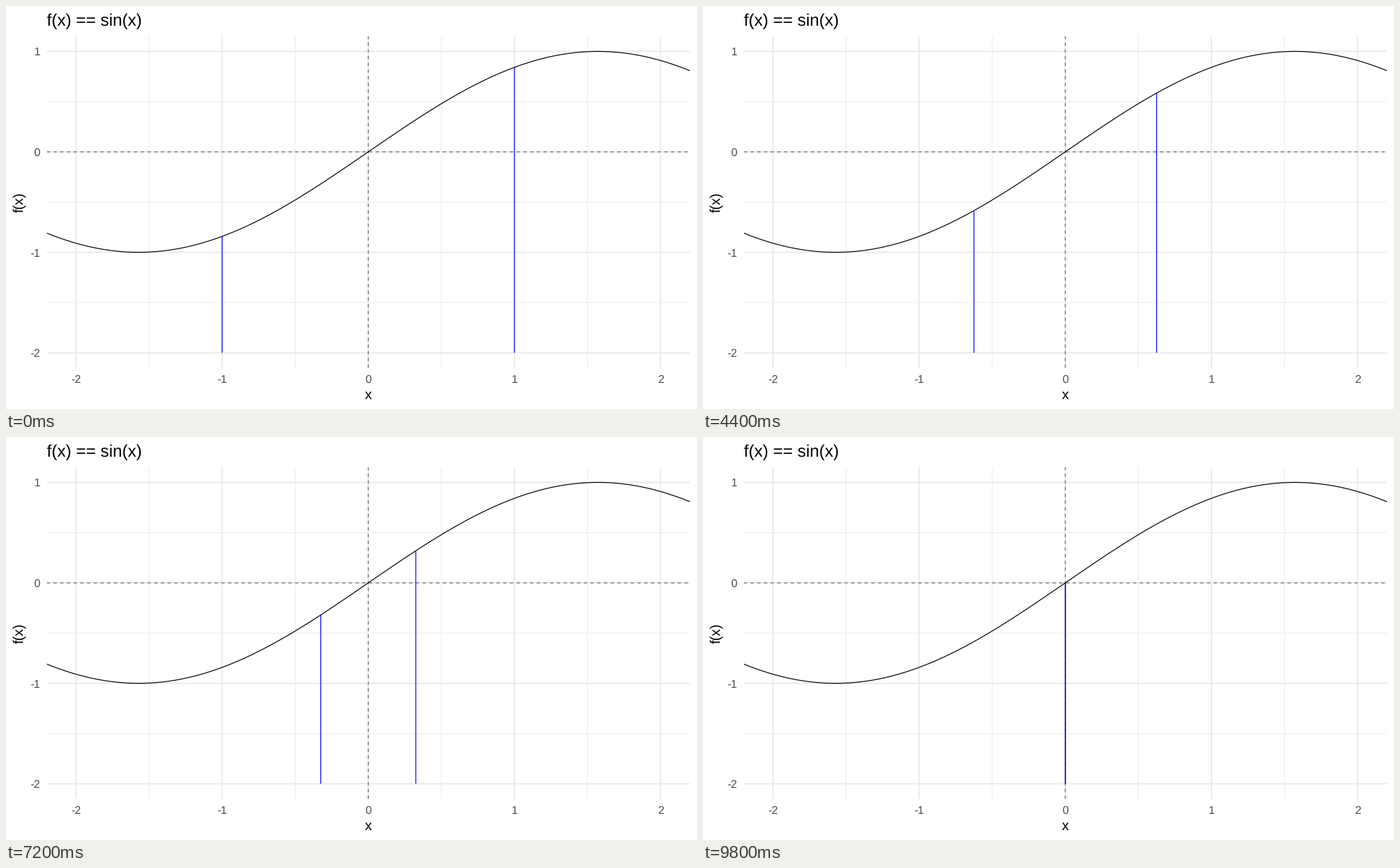
Write a matplotlib script that moves like this. It is 980 px wide and 572 px high and loops after 10 s.

```python
import numpy as np
import matplotlib.pyplot as plt
from matplotlib.animation import FuncAnimation

W, H, DPI = 980, 572, 100
PX = 72 / DPI                      # points per pixel
LEFT, RIGHT, TOP, BOTTOM = 57.75, 969.85, 43.05, 513.6
GRID, THIN = "#ebebeb", 1.19
INTERVAL, FRAMES = 100, 100

plt.rcParams.update({
    "font.family": "Liberation Sans",
    "text.hinting": "none",
    "text.hinting_factor": 1,
    "path.snap": False,
    "lines.solid_capstyle": "butt",
    "lines.dash_capstyle": "butt",
})

fig = plt.figure(figsize=(W / DPI, H / DPI), dpi=DPI, facecolor="white")
ax = fig.add_axes([LEFT / W, 1 - BOTTOM / H,
                   (RIGHT - LEFT) / W, (BOTTOM - TOP) / H])
ax.set(xlim=(-2.2, 2.2), ylim=(-2.15, 1.15))
ax.axis("off")


def line(xs, ys, color, width, **kw):
    return ax.plot(xs, ys, color=color, lw=width * PX, **kw)[0]


def hline(y, color, width, **kw):
    line([-2.2, 2.2], [y, y], color, width, **kw)


def vline(x, color, width, **kw):
    line([x, x], [-2.15, 1.15], color, width, **kw)


def label(x, y, text, size, color="black", **kw):
    fig.text(x / W, 1 - y / H, text, fontsize=size * PX, color=color,
             va="baseline", **kw)


def to_px(x, y):
    return (LEFT + (x + 2.2) / 4.4 * (RIGHT - LEFT),
            TOP + (1.15 - y) / 3.3 * (BOTTOM - TOP))


# Grid: minor lines below major ones
for y in (-1.5, -0.5, 0.5):
    hline(y, GRID, 1)
for x in (-1.5, -0.5, 0.5, 1.5):
    vline(x, GRID, 1)
for y in range(-2, 2):
    hline(y, GRID, 2)
for x in range(-2, 3):
    vline(x, GRID, 2)

dashed = dict(linestyle=(0, (4, 4)))
hline(0, "#666666", THIN, **dashed)
vline(0, "#666666", THIN, **dashed)

xs = np.linspace(-2.2, 2.2, 401)
line(xs, np.sin(xs), "black", THIN)
bars = [line([], [], "blue", THIN) for _ in range(2)]

# Text
label(57.5, 28, "f(x) == sin(x)", 24.48)
for x in range(-2, 3):
    label(to_px(x, 0)[0], 535, str(x), 16.32, "#4d4d4d", ha="center")
for y in range(-2, 2):
    label(48.5, to_px(0, y)[1] + 6, str(y), 16.32, "#4d4d4d", ha="right")
label(513.8, 558, "x", 20.4, ha="center")
fig.text(24.5 / W, 1 - 278.4 / H, "f(x)", fontsize=20.4 * PX, rotation=90,
         rotation_mode="anchor", ha="center", va="baseline")


def step_at(ms):
    """Steps of 300 ms at first, then of 200 ms."""
    if ms < 200:
        return 0
    if ms < 5600:
        return 1 + (ms - 200) // 300
    return 19 + (ms - 5600) // 200


def update(i):
    x = 1 - step_at(i * INTERVAL) / 40
    for bar, pos in zip(bars, (-x, x)):
        bar.set_data([pos, pos], [-2, np.sin(pos)])
    return bars


anim = FuncAnimation(fig, update, frames=FRAMES, interval=INTERVAL,
                     repeat=True, repeat_delay=0, blit=False)
plt.show()
```
